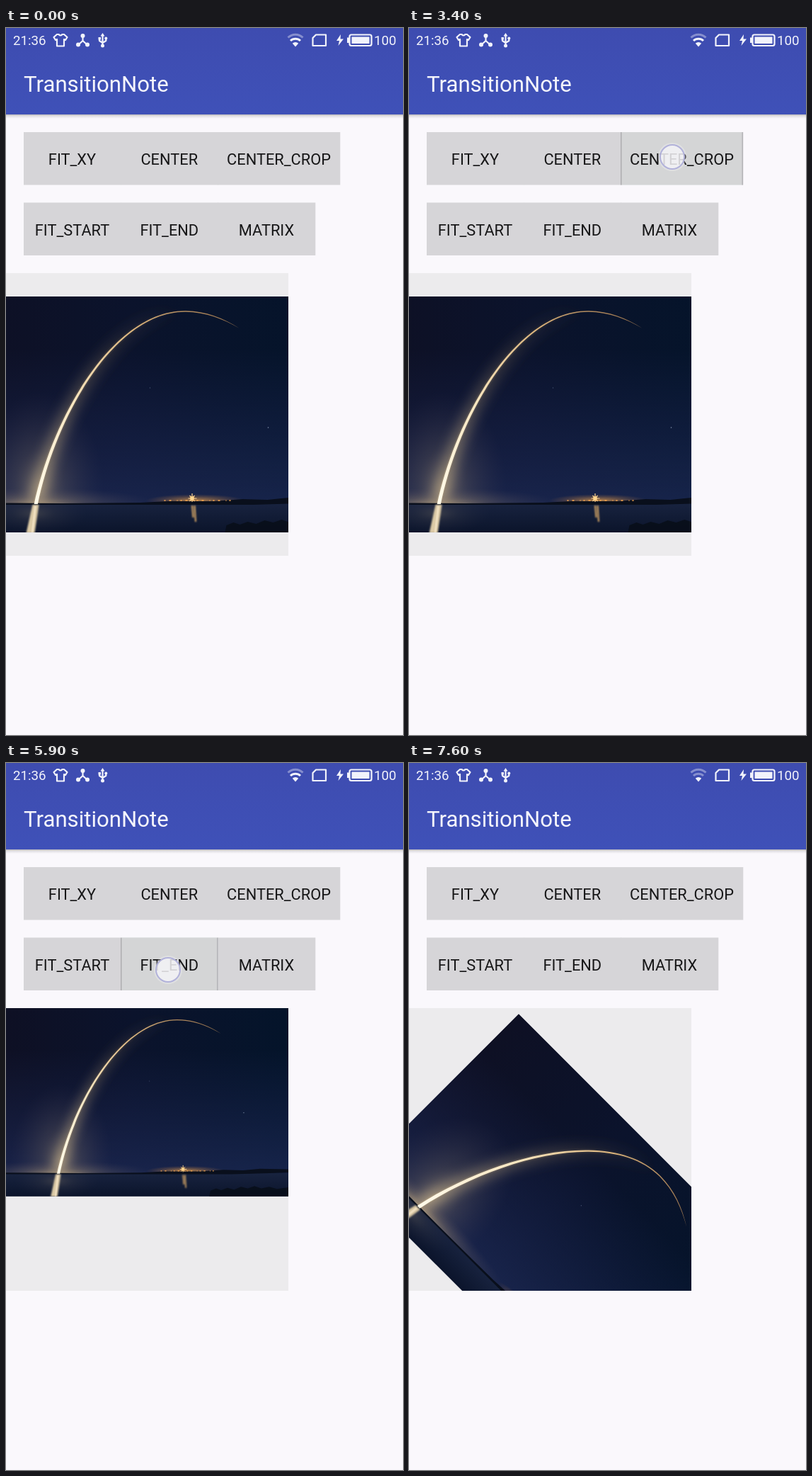
These frames come from a looping animation (561 by 998 pixels, 7.7 s). An HTML page:

```html
<!DOCTYPE html>
<html lang="en">
<head>
<meta charset="utf-8">
<title>Image scale types</title>
<style>
  html, body { margin: 0; width: 100%; height: 100%; overflow: hidden; background: #faf8fc; }
  #stage { display: block; width: 100vw; height: 100vh; font-family: Roboto, "Noto Sans", sans-serif; }
  .label { font-size: 21.8px; fill: #161617; text-anchor: middle; }
  .status { font-size: 18.7px; fill: #f2f3fb; }
  .line { fill: none; stroke: #f2f3fb; stroke-width: 2.2; stroke-linejoin: round; stroke-linecap: round; }
  .solid { fill: #f2f3fb; }
</style>
</head>
<body>
<svg id="stage" viewBox="0 0 561 998">
  <defs>
    <linearGradient id="bar" x2="0" y2="1">
      <stop stop-color="#3e4cb0"/><stop offset="1" stop-color="#3f51b8"/>
    </linearGradient>
    <linearGradient id="barShadow" x2="0" y2="1">
      <stop stop-color="#000" stop-opacity=".34"/>
      <stop offset=".45" stop-color="#000" stop-opacity=".1"/>
      <stop offset="1" stop-color="#000" stop-opacity="0"/>
    </linearGradient>
    <linearGradient id="sky">
      <stop stop-color="#0e1024"/><stop offset=".45" stop-color="#0b132c"/><stop offset="1" stop-color="#04142a"/>
    </linearGradient>
    <linearGradient id="dusk" x2="0" y2="1">
      <stop offset=".25" stop-color="#1c2756" stop-opacity="0"/>
      <stop offset="1" stop-color="#1e2b58" stop-opacity=".7"/>
    </linearGradient>
    <linearGradient id="water" x2="0" y2="1">
      <stop stop-color="#18233f"/><stop offset="1" stop-color="#0b142b"/>
    </linearGradient>
    <radialGradient id="glow">
      <stop stop-color="#c6ad82" stop-opacity=".6"/>
      <stop offset=".4" stop-color="#8c7c6c" stop-opacity=".3"/>
      <stop offset="1" stop-color="#50485a" stop-opacity="0"/>
    </radialGradient>
    <radialGradient id="town">
      <stop stop-color="#ffb04e" stop-opacity=".7"/><stop offset="1" stop-color="#b0703a" stop-opacity="0"/>
    </radialGradient>
    <linearGradient id="trail" gradientUnits="userSpaceOnUse" x1="92" y1="290" x2="380" y2="45">
      <stop stop-color="#fffaea"/><stop offset=".35" stop-color="#f8e6c0"/>
      <stop offset=".7" stop-color="#dcb57c"/><stop offset="1" stop-color="#9a744e"/>
    </linearGradient>
    <linearGradient id="haze" gradientUnits="userSpaceOnUse" x1="92" y1="290" x2="310" y2="30">
      <stop stop-color="#cdb78f" stop-opacity=".8"/>
      <stop offset=".5" stop-color="#86765f" stop-opacity=".45"/>
      <stop offset="1" stop-color="#6c5a4a" stop-opacity="0"/>
    </linearGradient>
    <filter id="soft" filterUnits="userSpaceOnUse" x="-40" y="-40" width="580" height="420">
      <feGaussianBlur stdDeviation="9"/>
    </filter>
    <filter id="blur" filterUnits="userSpaceOnUse" x="-40" y="-40" width="580" height="420">
      <feGaussianBlur stdDeviation="1.2"/>
    </filter>
    <clipPath id="frame"><path d="M0 0H399V399H0z"/></clipPath>
    <clipPath id="edge"><path d="M0 0H500V333H0z"/></clipPath>
    <clipPath id="above"><path d="M0 0H500V292H0z"/></clipPath>
  </defs>

  <rect width="561" height="998" fill="#faf8fc"/>
  <rect y="121" width="561" height="7" fill="url(#barShadow)"/>
  <rect width="561" height="122" fill="url(#bar)"/>
  <text x="25" y="90" font-size="31.2" fill="#f5f5fc">TransitionNote</text>

  <text class="status" x="10" y="24">21:36</text>
  <path class="line" d="M72 9 67.5 13 70 17 72 16V25.5H82V16L84 17 86.500 13 82 9H79.500Q77 12 74.500 9z"/>
  <path class="line" d="M108.500 11V18L102 24M108.500 18 115 24"/>
  <g class="solid">
    <circle cx="108.500" cy="11" r="3"/><circle cx="102" cy="23.500" r="3"/><circle cx="115" cy="23.500" r="3"/>
    <path d="M136.500 7 139.500 11.500H133.500zM130.500 13H134V16.500H130.500z"/>
    <circle cx="136.500" cy="25" r="2.500"/><circle cx="141.300" cy="14.500" r="2"/>
  </g>
  <path class="line" stroke-width="1.800" d="M136.500 10V24M132 16V18L136.500 21M141.300 15V18L136.500 21"/>
  <path class="line" style="stroke-width:3;stroke-linecap:butt" opacity=".4" d="M398.500 13.500a15 15 0 0 1 21 0"/>
  <path id="wifi" class="line" style="stroke-width:3;stroke-linecap:butt" d="M402 18a10 10 0 0 1 14 0"/>
  <path class="solid" d="M404.800 21.800a6 6 0 0 1 8.400 0L409 26.500z"/>
  <path class="line" d="M438 9.500H452V25H433.500V14z"/>
  <path class="solid" d="M473 9 467 18H471L469.500 25 477 15.500H472.500z"/>
  <rect class="line" x="485.500" y="9.500" width="31" height="15.500" rx="2.500"/>
  <path class="solid" d="M482 13.500H485V21H482zM488.500 12.500H513.500V22H488.500z"/>
  <text class="status" x="520" y="24">100</text>

  <g id="plates" fill="#d6d5d8"></g>
  <svg id="press">
    <g id="raised">
      <rect width="100%" height="100%" fill="#d4d5d6"/>
      <path d="M0 0V75" stroke="#adadb0" stroke-width="3"/>
      <line x1="100%" x2="100%" y2="75" stroke="#b4b4b7" stroke-width="3"/>
    </g>
    <circle id="ripple" cx="50%" cy="42"/>
  </svg>
  <g id="labels"></g>

  <g transform="translate(0 346)" clip-path="url(#frame)">
    <rect width="399" height="399" fill="#ecebed"/>
    <g id="photo"><g clip-path="url(#edge)">
      <rect width="500" height="333" fill="url(#sky)"/>
      <rect width="500" height="292" fill="url(#dusk)"/>
      <g clip-path="url(#above)">
        <ellipse cx="98" cy="270" rx="90" ry="135" fill="url(#glow)" opacity=".8"/>
        <ellipse cx="94" cy="292" rx="170" ry="22" fill="url(#glow)"/>
        <path filter="url(#soft)" fill="none" stroke="url(#haze)" stroke-width="16"
          d="M92.500 292C120 165 205 21 303.500 21"/>
        <path filter="url(#blur)" fill="none" stroke="url(#haze)" stroke-width="5"
          d="M92.500 292C120 165 205 21 303.500 21"/>
      </g>
      <ellipse cx="318" cy="288" rx="70" ry="9" fill="url(#town)"/>
      <rect y="292" width="500" height="41" fill="url(#water)"/>
      <ellipse cx="90" cy="306" rx="75" ry="30" fill="url(#glow)" opacity=".35"/>
      <path fill="#090f1c" d="M0 291 60 291.500 130 292 240 291 280 289 345 289 385 286 420 287 450 284 500 285V291L400 294H0z"/>
      <path fill="url(#trail)" d="M90.200 293C118 165 204 20.300 303 20.200C332 20.200 357 30 380.500 45C357 31.500 332 21.700 303 21.700C206 21.900 122 165 95.400 293z"/>
      <path filter="url(#blur)" fill="#dccaa6" d="M88 294H97L91 334H79z"/>
      <path stroke="#fff0d5" stroke-width="3" d="M87.500 334 92 296" opacity=".5"/>
      <circle cx="313.500" cy="285" r="3" fill="#ffc56c"/>
      <path stroke="#ffd795" stroke-width="1.200" d="M313.500 278V290M308 285H320M310 281 317 289M317 281 310 289"/>
      <path stroke="#f0a24c" stroke-width="2" stroke-dasharray="2 5 3 8 1 4" opacity=".8" d="M274 288H368"/>
      <path filter="url(#blur)" stroke="#e0ad68" stroke-width="2" d="M313.500 295 315 312M317 295 318.500 318"/>
      <path fill="#080d18" opacity=".85" d="M360 333 362 323 372 319 381 322 392 318 404 321 416 316 428 319 440 315 452 319 466 316 480 320 500 317V333z"/>
      <circle cx="421" cy="185" r=".8" fill="#8493ae"/>
      <circle cx="254" cy="129" r=".7" fill="#44506e"/>
    </g></g>
  </g>

  <g id="finger">
    <circle r="20" fill="#fff" opacity=".25"/>
    <circle r="17" fill="#f4f3f7" fill-opacity=".8" stroke="#b2b2da" stroke-width="2"/>
  </g>
</svg>
<script>
const $ = id => document.getElementById(id);
const LOOP = 7700, STEP = 100, MOVE = 300;
const VIEW = 399, W = 500, H = 333, Q = Math.SQRT1_2;
const fit = VIEW / W, fill = VIEW / H;

// Image matrices: a, b, c, d, tx, ty
const modes = {
  FIT_XY: [fit, 0, 0, fill, 0, 0],
  CENTER: [1, 0, 0, 1, (VIEW - W) / 2, (VIEW - H) / 2],
  CENTER_CROP: [fill, 0, 0, fill, (VIEW - W * fill) / 2, 0],
  FIT_START: [fit, 0, 0, fit, 0, 0],
  FIT_END: [fit, 0, 0, fit, 0, VIEW - H * fit],
  MATRIX: [Q, Q, -Q, Q, 155, 8]
};

// x, y, width
const buttons = {
  FIT_XY: [25, 147, 137],
  CENTER: [162, 147, 137.5],
  CENTER_CROP: [299, 147, 173],
  FIT_START: [25, 246.5, 137],
  FIT_END: [162, 246.5, 137.5],
  MATRIX: [299, 246.5, 138]
};

const taps = [
  { down: 900, up: 980, x: 93, y: 190, mode: 'FIT_XY' },
  { down: 2000, up: 2150, x: 231, y: 196, mode: 'CENTER' },
  { down: 3400, up: 3480, x: 372, y: 182, mode: 'CENTER_CROP' },
  { down: 4700, up: 4780, x: 93, y: 290, mode: 'FIT_START' },
  { down: 5900, up: 5980, x: 229, y: 292, mode: 'FIT_END' },
  { down: 7000, up: 7250, x: 367, y: 287, mode: 'MATRIX' }
];

const clamp = v => Math.min(1, Math.max(0, v));
const ease = v => (1 - Math.cos(Math.PI * clamp(v))) / 2;
const show = (el, on) => el.setAttribute('visibility', on ? 'visible' : 'hidden');

function set(el, attrs) {
  for (const key in attrs) el.setAttribute(key, attrs[key]);
  return el;
}

function add(parent, tag, attrs) {
  const el = document.createElementNS('http://www.w3.org/2000/svg', tag);
  return parent.appendChild(set(el, attrs));
}

for (const [name, [x, y, width]] of Object.entries(buttons)) {
  add($('plates'), 'rect', { x, y, width: width + .3, height: 74.5 });
  add($('labels'), 'text', { x: x + width / 2, y: y + 46.3, class: 'label' }).textContent = name;
}

function draw(t) {
  const i = taps.findLastIndex(tap => tap.down <= t);
  const tap = taps[i];
  const from = modes[i > 0 ? taps[i - 1].mode : 'CENTER'];
  const to = tap ? modes[tap.mode] : from;
  const k = tap ? ease((t - tap.up) / MOVE) : 0;
  const matrix = from.map((v, n) => v + (to[n] - v) * k);
  set($('photo'), { transform: `matrix(${matrix})` });
  set($('wifi'), { opacity: t < 7300 ? 1 : .4 });

  const held = Boolean(tap) && t < tap.up;
  show($('finger'), held);
  show($('press'), tap);
  show($('raised'), held && t >= tap.up - 100);
  if (!tap) return;

  const [x, y, width] = buttons[tap.mode];
  set($('press'), { x, y, width, height: 74.5 });
  set($('ripple'), {
    r: Math.min(200, (t - tap.down) * .4),
    opacity: .06 * clamp((tap.up + MOVE - t) / 150)
  });
  set($('finger'), { transform: `translate(${tap.x} ${tap.y})` });
}

// The screen refreshes ten times a second.
function tick() {
  draw(Math.floor(performance.now() % LOOP / STEP) * STEP);
  requestAnimationFrame(tick);
}
tick();
</script>
</body>
</html>
```
